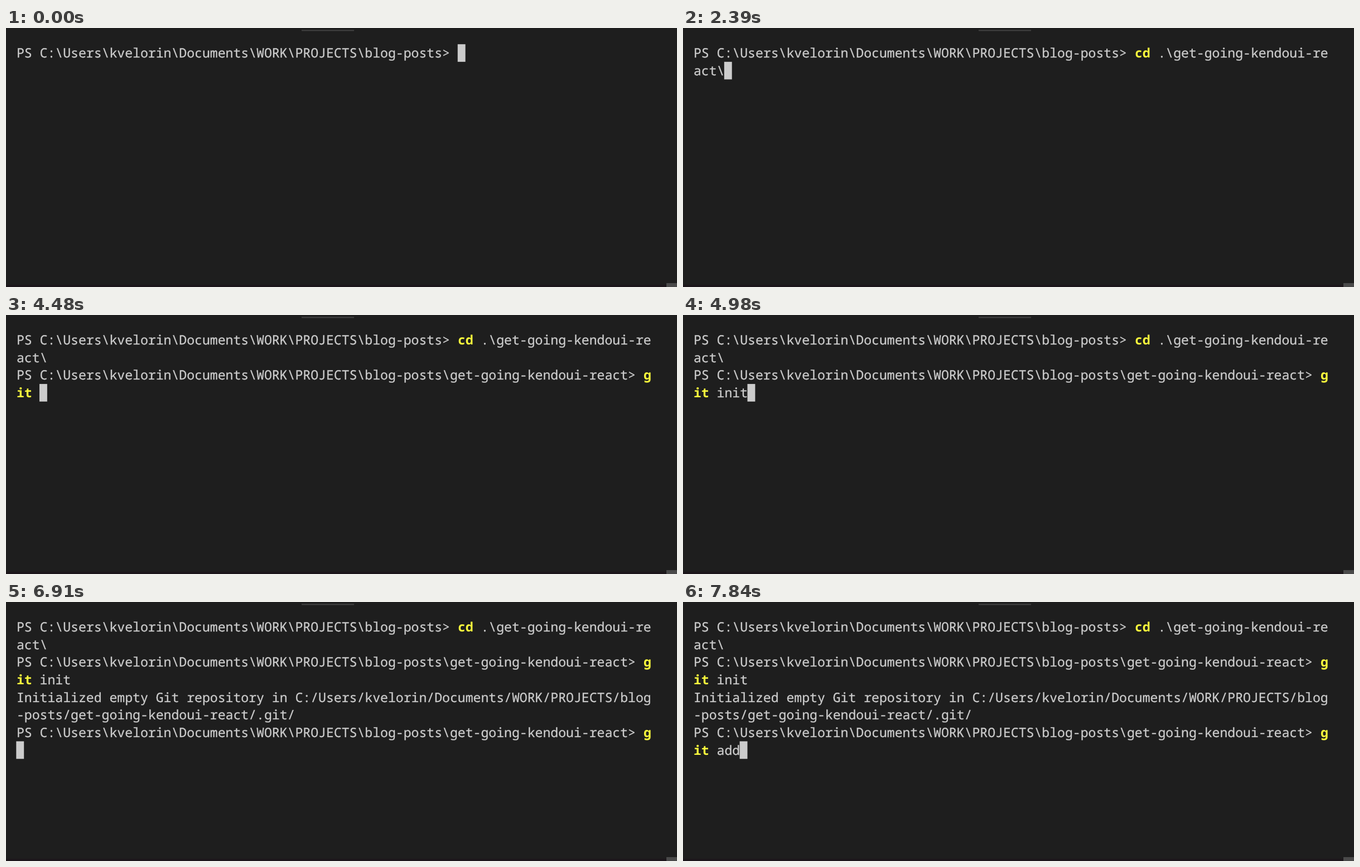
Write an HTML page that moves like this. It is 1203x466 px and loops after 7990 ms.

```html
<!DOCTYPE html>
<html lang="en">
<head>
<meta charset="utf-8">
<title>Terminal session</title>
<style>
  html, body { margin: 0; width: 100%; height: 100%; overflow: hidden; background: #1e1e1e; }
  svg { display: block; width: 1203px; height: 466px; }
  text {
    font: 23.14px "Noto Sans Mono", "DejaVu Sans Mono", monospace;
    white-space: pre;
    text-rendering: geometricPrecision;
  }
  .plain { fill: #ccc; stroke: #ccc; stroke-width: 0.3px; }
  .command { font-weight: 700; fill: #f9f93c; }
</style>
</head>
<body>
<svg viewBox="0 0 1203 466">
  <rect width="1203" height="466" fill="#1e1e1e"/>
  <rect x="530" y="3.4" width="94" height="2" fill="#424242"/>
  <rect y="462" width="1203" height="4" fill="#1c161b"/>
  <rect x="1184" y="459" width="19" height="7" fill="#4a4a4a"/>
  <g id="screen"></g>
  <rect id="cursor" width="13.885" height="31.63" fill="#ccc"/>
</svg>
<script>
const DURATION = 7990, COLUMNS = 82;
const LEFT = 18.3, TOP = 29.2, CELL = 13.885, LINE = 31.63;
const BEARING = 0.7, BASELINE = 24;

const root = "C:\\Users\\kvelorin\\Documents\\WORK\\PROJECTS\\blog-posts";
const project = root + "\\get-going-kendoui-react";
const prompt = path => `PS ${path}> `;
const gitFolder = project.replaceAll("\\", "/") + "/.git/";

// Each step appends output: [time, text, isCommand]
const steps = [
  [0, prompt(root)],
  [250, "c", true],
  [300, "d", true],
  [930, " "],
  [2220, "."],
  [2390, "\\get-going-kendoui-react\\"],
  [3080, "\n" + prompt(project)],
  [4100, "g", true],
  [4270, "i", true],
  [4370, "t", true],
  [4480, " "],
  [4580, "i"],
  [4660, "n"],
  [4810, "i"],
  [4980, "t"],
  [5060, "\n"],
  [5270, `Initialized empty Git repository in ${gitFolder}\n` + prompt(project)],
  [6910, "g", true],
  [7010, "i", true],
  [7100, "t", true],
  [7190, " "],
  [7290, "a"],
  [7690, "d"],
  [7840, "d"]
];

const screen = document.getElementById("screen");
const cursor = document.getElementById("cursor");

function add(parent, tag, attributes) {
  const node = document.createElementNS("http://www.w3.org/2000/svg", tag);
  for (const name in attributes) node.setAttribute(name, attributes[name]);
  return parent.appendChild(node);
}

function draw(count) {
  screen.replaceChildren();
  let row = 0, column = 0, line = null, run = null;

  const nextRow = () => { row++; column = 0; line = run = null; };

  for (const [, text, isCommand] of steps.slice(0, count)) {
    const style = isCommand ? "command" : "plain";
    for (const char of text) {
      if (char === "\n") { nextRow(); continue; }
      line ??= add(screen, "text", { x: LEFT + BEARING, y: TOP + row * LINE + BASELINE });
      if (run?.getAttribute("class") !== style) run = add(line, "tspan", { class: style });
      run.textContent += char;
      if (++column === COLUMNS) nextRow();
    }
  }

  cursor.setAttribute("x", LEFT + column * CELL);
  cursor.setAttribute("y", TOP + row * LINE);
}

let shown = 0;
const start = performance.now();

function tick() {
  const time = Math.max(0, performance.now() - start) % DURATION;
  const count = steps.filter(([at]) => at <= time).length;
  if (count !== shown) draw(shown = count);
  requestAnimationFrame(tick);
}
tick();
</script>
</body>
</html>
```
